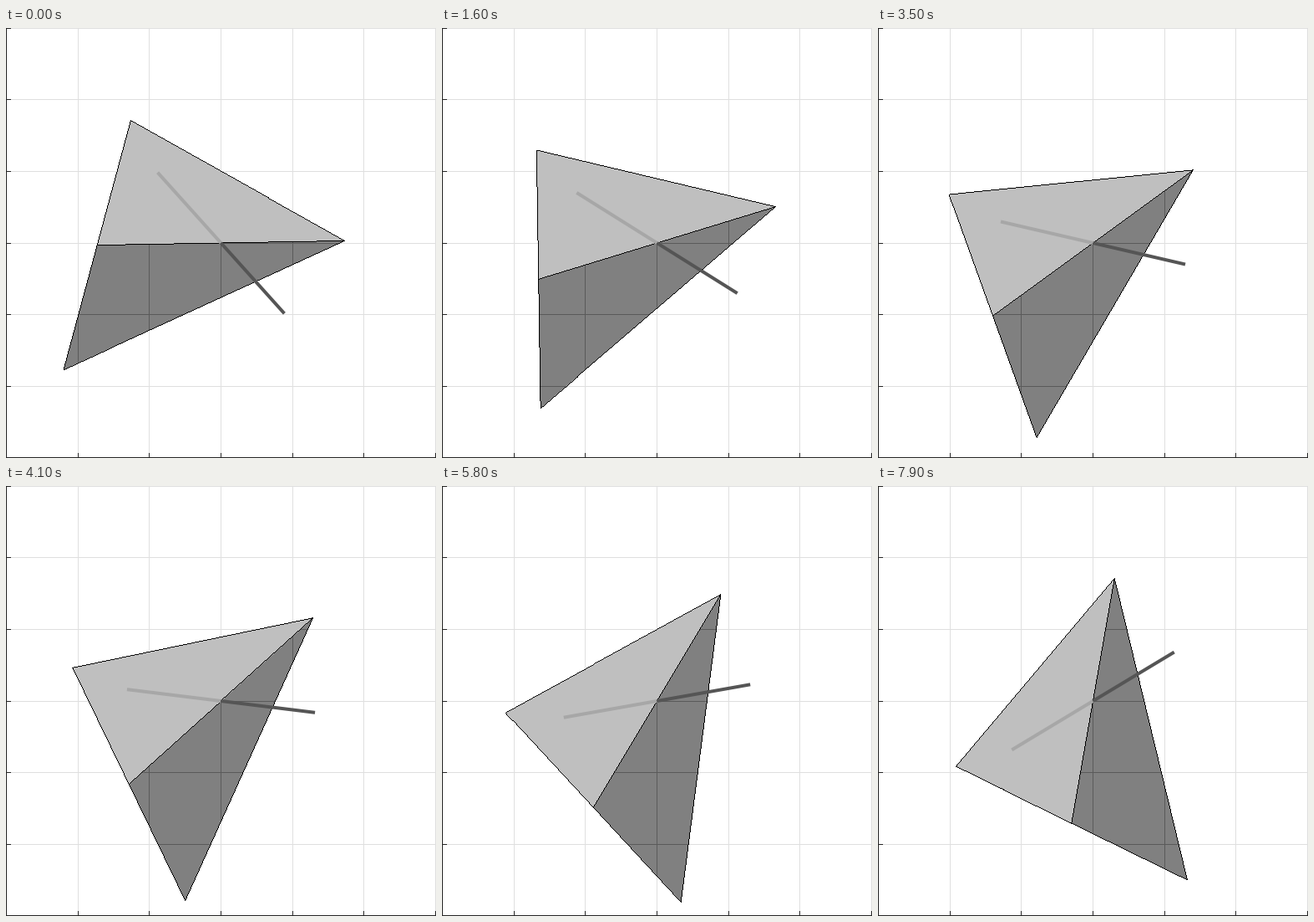
A matplotlib script that plays this animation: 515 px wide and 514 px high, repeating every 8000 ms.

```python
import numpy as np
import matplotlib.pyplot as plt
from matplotlib.animation import FuncAnimation
from matplotlib.patches import Polygon

W, H, DPI = 515, 514, 100
FRAMES, INTERVAL = 80, 100
PX = 72 / DPI
UNIT = 85.6
CENTER = np.array([W / 2, H / 2])

# Body shape in grid units, symmetric axis along +x
R = np.sqrt(3)
TIP, HINGE = (R, 0), (-R, 0)
TOP, BOTTOM = (0.5 - R, R), (-0.5 - R, -R)
ROD = 1.325
ROD_LAG = 49

TICK = 6
AXIS = "#262626"

fig = plt.figure(figsize=(W / DPI, H / DPI), dpi=DPI, facecolor="white")
ax = fig.add_axes([0, 0, 1, 1])
ax.axis("off")


def segment(x, y, color, width=1, z=1):
    line, = ax.plot(x, y, color=color, lw=width * PX, zorder=z,
                    solid_capstyle="butt", snap=False)
    return line


def face(color, z):
    return ax.add_patch(Polygon(np.zeros((3, 2)), closed=True, facecolor=color,
                                edgecolor="none", snap=False, zorder=z))


# Pixel centres of the grid lines
steps = np.arange(7) * 514 / 6
xs = np.floor(steps + 0.5) + 0.5
ys = np.minimum(np.floor(steps), H - 1) + 0.5


def grid(color, z):
    return ([segment([x, x], [0, H], color, z=z) for x in xs]
            + [segment([0, W], [y, y], color, z=z) for y in ys])


grid("#dfdfdf", 1)
for x in xs:
    segment([x, x], [H - TICK, H], AXIS, z=1.5)
for y in ys:
    segment([0, TICK], [y, y], AXIS, z=1.5)
segment([0.5, 0.5], [0, H], AXIS, z=1.5)
segment([0, W], [H - 0.5, H - 0.5], AXIS, z=1.5)

dark = face("#808080", 2)
shaded_grid = grid("#5a5a5a", 3)
light = face("#bfbfbf", 4)
outline = ax.imshow(np.zeros((H, W, 4), np.uint8), extent=[0, W, H, 0],
                    aspect="auto", interpolation="nearest", zorder=5)
rod_light = segment([], [], "#a7a7a7", 4, 6)
rod_dark = segment([], [], "#555555", 4, 6)

ax.set_xlim(0, W)
ax.set_ylim(H, 0)


def place(points, degrees):
    """Rotate points counter-clockwise and map them to pixels."""
    a = np.radians(degrees)
    x, y = np.array(points, float).T
    turned = np.column_stack([x * np.cos(a) - y * np.sin(a),
                              -x * np.sin(a) - y * np.cos(a)])
    return CENTER + UNIT * turned


def hairlines(points):
    """Black one-pixel polyline without smoothing."""
    ink = np.zeros((H, W, 4), np.uint8)
    for a, b in zip(points, points[1:]):
        count = int(np.ceil(np.abs(b - a).max())) + 1
        cols, rows = np.floor(np.linspace(a, b, count)).astype(int).T
        ink[rows, cols, 3] = 255
    return ink


def update(i):
    angle = i + 1
    light.set_xy(place([TIP, TOP, HINGE], angle))
    dark.set_xy(place([TIP, HINGE, BOTTOM], angle))
    for line in shaded_grid:
        line.set_clip_path(dark)
    outline.set_data(hairlines(place([TIP, TOP, BOTTOM, TIP, HINGE], angle)))
    rod_light.set_data(*place([(-ROD, 0), (0, 0)], angle - ROD_LAG).T)
    rod_dark.set_data(*place([(0, 0), (ROD, 0)], angle - ROD_LAG).T)
    return light, dark, outline, rod_light, rod_dark


anim = FuncAnimation(fig, update, frames=FRAMES, interval=INTERVAL,
                     repeat=True, repeat_delay=0, blit=False)
plt.show()
```
